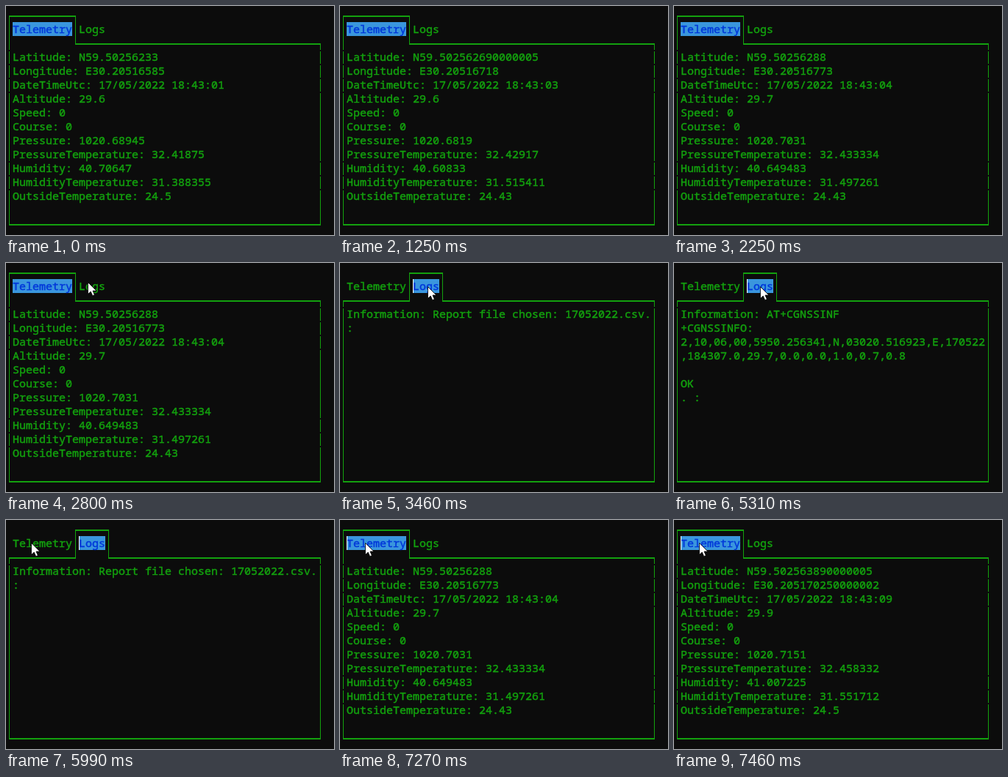
Write an HTML page with a canvas that moves like this. It is 446 px wide and 313 px high and loops after 8000 ms.

```html
<!DOCTYPE html>
<html lang="en">
<head>
<meta charset="utf-8">
<title>Telemetry console</title>
<style>
  html, body { margin: 0; width: 100%; height: 100%; overflow: hidden; background: #0c0c0c; }
  canvas { display: block; }
</style>
</head>
<body>
<canvas id="screen" width="446" height="313"></canvas>
<script>
const ctx = document.getElementById('screen').getContext('2d');
const LOOP = 8000, COL = 9, ROW = 19, LEFT = 9, TOP = 75;
const GREEN = '#13a10e', BACK = '#0c0c0c', SELECTED = '#3a96dd', SELECTED_TEXT = '#0037da';

const labels = ['Latitude', 'Longitude', 'DateTimeUtc', 'Altitude', 'Speed', 'Course', 'Pressure',
  'PressureTemperature', 'Humidity', 'HumidityTemperature', 'OutsideTemperature'];

const reading = (lat, lon, second, altitude, ...sensors) =>
  ['N59.' + lat, 'E30.' + lon, '17/05/2022 18:43:0' + second, altitude, '0', '0', ...sensors];

const first = reading('50256233', '20516585', 1, '29.6', '1020.68945', '32.41875', '40.70647', '31.388355', '24.5');
const second = reading('50256251', '20516652', 2, '29.6', '1020.6846', '32.424583', '40.72406', '31.452883', '24.43');
const readings = [
  [0, first],
  [190, [...second.slice(0, 4), ...first.slice(4)]],
  [260, second],
  [1250, reading('502562690000005', '20516718', 3, '29.6', '1020.6819', '32.42917', '40.60833', '31.515411', '24.43')],
  [2250, reading('50256288', '20516773', 4, '29.7', '1020.7031', '32.433334', '40.649483', '31.497261', '24.43')],
  [7460, reading('502563890000005', '205170250000002', 9, '29.9', '1020.7151', '32.458332', '41.007225', '31.551712', '24.5')]
];

const report = ['Information: Report file chosen: 17052022.csv.', ':'];
const logs = [
  [0, report],
  [4320, [...report, '', '', '', 'OK', '. :']],
  [4390, report],
  [5310, ['Information: AT+CGNSSINF', '+CGNSSINFO:',
    '2,10,06,00,5950.256341,N,03020.516923,E,170522',
    ',184307.0,29.7,0.0,0.0,1.0,0.7,0.8', '', 'OK', '. :']],
  [5380, report]
];

// Pointer positions: time, x, y
const path = [
  [2320, 150, -6], [2480, 126, 9], [2660, 109, 22], [2800, 111, 26], [2930, 119, 32],
  [4320, 119, 32], [4520, 117, 32], [5570, 117, 32], [5640, 110, 32], [5780, 70, 32], [5920, 40, 31], [5990, 34, 31]
];

const latest = (steps, t) => steps.filter(([start]) => start <= t).pop()[1];
const within = (t, start, end) => t >= start && t < end;

function fill(color, x, y, w, h) {
  ctx.fillStyle = color;
  ctx.fillRect(x, y, w, h);
}

// A thin stroke gives the letters a medium weight.
function text(string, x, baseline, color = GREEN) {
  ctx.fillStyle = ctx.strokeStyle = color;
  ctx.lineWidth = 0.45;
  ctx.fillText(string, x, baseline);
  ctx.strokeText(string, x, baseline);
}

const across = (x1, x2, y) => fill(GREEN, x1, y, x2 - x1, 2);
const down = (x, y1, y2) => fill(GREEN, x, y1, 1, y2 - y1);

function drawFrame(logsOpen) {
  const start = logsOpen ? 94 : 4, end = logsOpen ? 139 : 94;
  across(start, end + 1, 13);
  down(start, 13, 52);
  down(end, 13, 52);
  across(4, start + 1, 51);
  across(end, 428, 51);
  across(4, 428, 298);
  down(4, 52, 299);
  down(427, 52, 299);
  if (!logsOpen) fill(BACK, 5, 51, 89, 2);
  const gapRows = logsOpen ? [0] : [0, 1, 2, 3, 8, 9, 10];
  for (const row of gapRows) {
    for (const x of [3, 426]) fill(BACK, x, 60 + row * ROW, 3, 2);
  }
}

function drawTab(name, x, selected) {
  if (selected) fill(SELECTED, x, 22, name.length * COL, ROW);
  text(name, x, 37, selected ? SELECTED_TEXT : GREEN);
}

function pointerAt(t) {
  const time = Math.floor((t - 2250) / 68) * 68 + 2250;
  const next = path.findIndex(([when]) => when > time);
  if (next < 0) return path[path.length - 1].slice(1);
  const [t1, x1, y1] = path[Math.max(0, next - 1)];
  const [t2, x2, y2] = path[next];
  const p = Math.max(0, (time - t1) / (t2 - t1));
  return [Math.round(x1 + (x2 - x1) * p), Math.round(y1 + (y2 - y1) * p)];
}

const arrow = new Path2D('M.5 .5V16.5L4.2 13L6.7 18.7L9.4 17.5L7 12H12Z');

function drawPointer(t) {
  const exact = path.find(([when]) => t >= when && t < when + 60);
  const [x, y] = exact ? exact.slice(1) : pointerAt(t);
  if (within(t, 3060, 3200) || within(t, 6870, 7000)) {
    ctx.fillStyle = 'rgba(255, 255, 0, .47)';
    ctx.beginPath();
    ctx.arc(x, y, 12, 0, Math.PI * 2);
    ctx.fill();
  }
  ctx.save();
  ctx.translate(x, y);
  ctx.fillStyle = '#fff';
  ctx.strokeStyle = '#000';
  ctx.lineWidth = 0.8;
  ctx.fill(arrow);
  ctx.stroke(arrow);
  ctx.restore();
}

function draw(t) {
  const logsOpen = within(t, 3460, 7270);
  fill(BACK, 0, 0, 446, 313);
  ctx.font = '15px "Noto Sans Mono", "DejaVu Sans Mono", monospace';
  ctx.lineJoin = 'round';
  drawFrame(logsOpen);
  drawTab('Telemetry', LEFT, !logsOpen);
  drawTab('Logs', 99, logsOpen);
  const lines = logsOpen ? latest(logs, t)
    : latest(readings, t).map((value, i) => `${labels[i]}: ${value}`);
  lines.forEach((line, i) => text(line, LEFT, TOP + i * ROW));
  // The text caret shows once the window has focus.
  if (t >= 3060 && !within(t, 4320, 4390)) fill('#fff', logsOpen ? 99 : LEFT, 22, 1, ROW);
  if (t >= 2320) drawPointer(t);
}

const begin = performance.now();
function tick() {
  draw((performance.now() - begin) % LOOP);
  requestAnimationFrame(tick);
}
tick();
</script>
</body>
</html>
```
